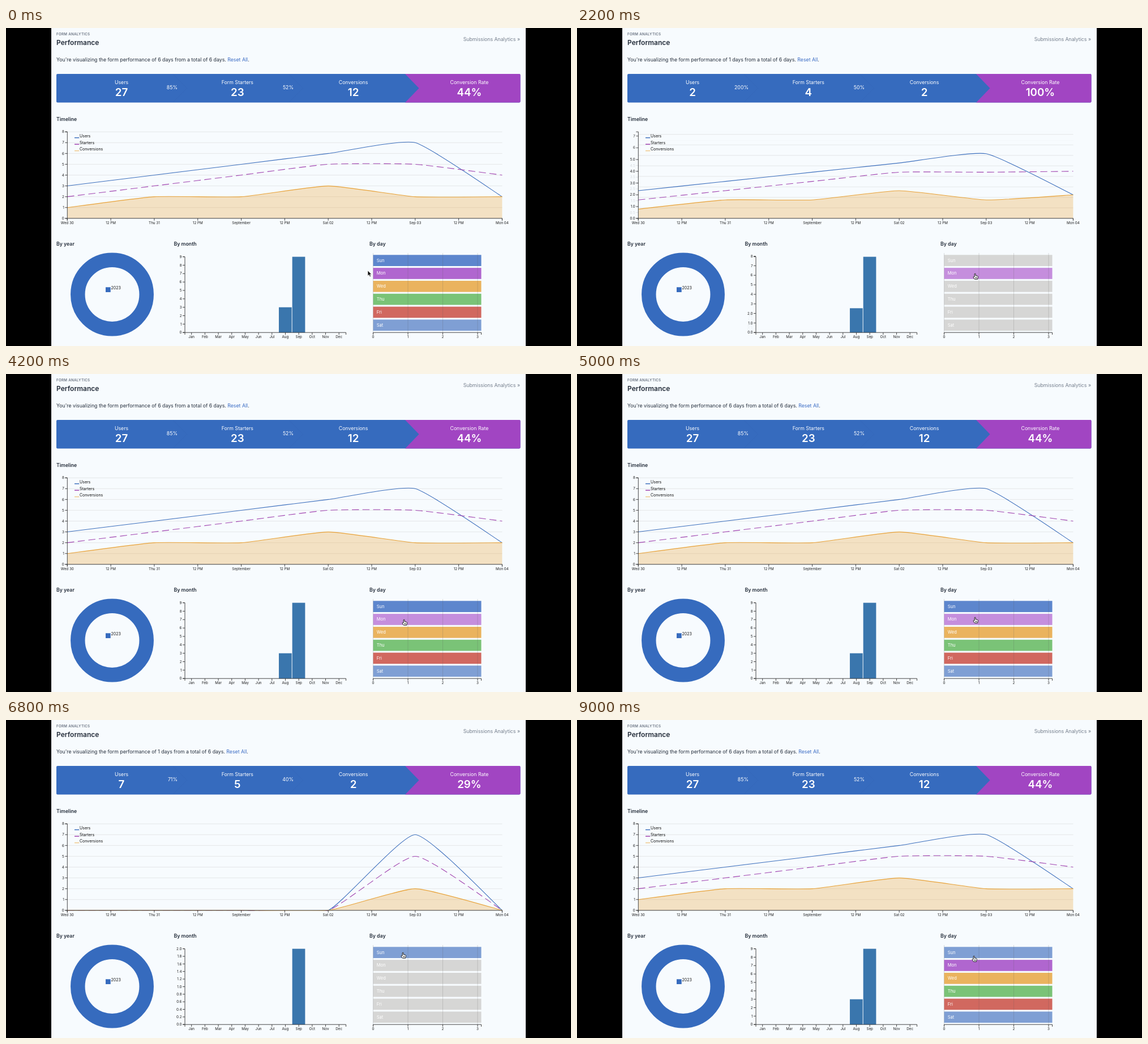
These frames come from a looping animation (998x561 px, 9200 ms). An HTML page:

```html
<!DOCTYPE html>
<html lang="en">
<head>
<meta charset="utf-8">
<title>Form performance</title>
<style>
  html, body { margin: 0; width: 100%; height: 100%; overflow: hidden; background: #000; }
  svg { display: block; width: 998px; height: 561px; font: 8.75px Inter, sans-serif; fill: #242d3a; }
  .head { font-weight: 600; }
  .axis { font-size: 6.25px; fill: #1c1c1c; }
  .legend { font-size: 7px; fill: #111; }
  .rule { fill: none; stroke: #333; stroke-width: .9; }
  .grid { stroke: #ccc; stroke-opacity: .5; stroke-width: .9; }
  .series { fill: none; stroke-width: 1.1; }
  .funnel { fill: #fff; text-anchor: middle; }
  .big { font-size: 18.75px; font-weight: 600; }
  .mid { text-anchor: middle; }
  .end { text-anchor: end; }
</style>
</head>
<body>
<svg viewBox="0 0 998 561">
  <defs>
    <clipPath id="plot"><rect x="108" y="182" width="769" height="154.5"/></clipPath>
    <clipPath id="timelineBox"><rect x="80" y="176" width="838" height="180"/></clipPath>
    <clipPath id="monthBox"><rect x="290" y="395" width="330" height="160"/></clipPath>
  </defs>
  <rect width="998" height="561" fill="#000"/>
  <rect x="80" width="838" height="561" fill="#f7fbfe"/>

  <text x="89" y="13.2" font-size="6.25" font-weight="600" letter-spacing=".25" fill="#6b7482">FORM ANALYTICS</text>
  <text x="89" y="29.6" font-size="12" class="head">Performance</text>
  <text x="908" y="23" class="end" fill="#737d8b">Submissions Analytics »</text>
  <text x="89" y="58.8">You're visualizing the form performance of <tspan id="days"></tspan> days from a total of 6 days. <tspan fill="#3a6bc4">Reset All</tspan>.</text>

  <rect x="89" y="81" width="819.5" height="50.5" rx="2" fill="#366bbe"/>
  <path d="M705 81H906.5a2 2 0 0 1 2 2V129.500a2 2 0 0 1 -2 2H705L729.500 106.200Z" fill="#a145c2"/>
  <path d="M295 81.500L319.500 106.200 295 131M500 81.500L524.500 106.200 500 131" fill="none" stroke="#2d5ca8" stroke-opacity=".2"/>
  <g id="funnel"></g>

  <g class="head">
    <text x="89" y="163.500">Timeline</text>
    <text x="89" y="383.500">By year</text>
    <text x="296.500" y="383.500">By month</text>
    <text x="642" y="383.500">By day</text>
  </g>

  <g id="timeline" clip-path="url(#timelineBox)"></g>
  <g id="timeAxis"></g>

  <circle cx="187.500" cy="470" r="60.700" fill="none" stroke="#366bbe" stroke-width="25.500"/>
  <rect x="176" y="457.300" width="8.700" height="8.700" fill="#366bbe"/>
  <text x="185.500" y="460.700" class="legend">2023</text>

  <g id="month" clip-path="url(#monthBox)"></g>
  <g id="monthAxis"></g>
  <g id="day"></g>
  <g id="cursor" stroke="#111" fill="#fff" stroke-width=".9" stroke-linejoin="round"></g>
</svg>
<script>
const LOOP = 9200, FRAME = 200, DURATION = 750;
const BLUE = '#3e70bd', PURPLE = '#a044b0', ORANGE = '#e8a33a';
const el = id => document.getElementById(id);
const lerp = (a, b, p) => a + (b - a) * p;
const clamp = v => Math.max(0, Math.min(1, v));
const ease = p => p < .5 ? 4 * p ** 3 : 1 - 4 * (1 - p) ** 3;
const text = (x, y, s, cls, more = '') => `<text x="${x}" y="${y}" class="${cls}" ${more}>${s}</text>`;
const line = (x1, y1, x2, y2, cls, more = '') =>
  `<line x1="${x1}" y1="${y1}" x2="${x2}" y2="${y2}" class="${cls}" ${more}/>`;
const range = n => [...Array(n).keys()];

// Daily counts, and the same counts with only one day selected
const users = [3, 4, 5, 6, 7, 2], starters = [2, 3, 4, 5, 5, 4], conversions = [1, 2, 2, 3, 2, 2];
const view = (day, timeScale, monthScale, months) => ({
  day, months, timeScale, monthScale,
  series: [users, starters, conversions].map(s => s.map((v, i) => day < 0 || i === day ? v : 0))
});
const scale = (max, step) => ({ max, step, digits: step < 1 ? 1 : 0, count: Math.round(max / step) + 1 });
const all = view(-1, scale(8, 1), scale(9, 1), [3, 9]);
const monday = view(5, scale(5, .5), scale(2, .2), [0, 2]);
const sunday = view(4, scale(8, 1), scale(2, .2), [0, 2]);
const changes = [
  { at: -2000, to: all, lag: 0 },
  { at: 1951, to: monday, lag: 90 },
  { at: 3380, to: all, lag: 20 },
  { at: 5980, to: sunday, lag: 20 },
  { at: 7660, to: all, lag: 20 }
];

const timeBox = { x: 108.3, base: 335.8, height: 152.6 };
const monthBox = { x: 316, base: 537.2, height: 133.6 };

// Shared ticks slide, others fade in or out while sliding
function yAxis(box, from, to, p) {
  const ticks = s => range(s.count).map(i => +(i * s.step).toFixed(1));
  const before = ticks(from), after = ticks(to);
  return [...new Set([...before, ...after])].map(v => {
    const y = box.base - box.height * lerp(v / from.max, v / to.max, p);
    const stays = after.includes(v);
    const opacity = !stays ? 1 - p : before.includes(v) ? 1 : p;
    if (opacity < .01 || y < 0) return '';
    return `<g opacity="${opacity}">${line(box.x - 4, y, box.x, y, 'rule')}${
      text(box.x - 5.5, y + 2.2, v.toFixed(stays ? to.digits : from.digits), 'axis end')}</g>`;
  }).join('') + `<path class="rule" d="M${box.x - 4} ${box.base - box.height}h4v${box.height}h-4"/>`;
}

function gridLines(box, from, to, p) {
  return range(to.count).map(i => {
    const end = i * to.step / to.max, isNew = i >= from.count;
    const y = box.base - box.height * (isNew ? end : lerp(i * from.step / from.max, end, p));
    return line(box.x, y, 876.5, y, 'grid', `opacity="${isNew ? p : 1}"`);
  }).join('');
}

// Cardinal spline
function curve(pts) {
  const k = .08, at = i => pts[Math.max(0, Math.min(pts.length - 1, i))];
  return `M${pts[0]}` + pts.slice(1).map((c, i) => {
    const a = at(i - 1), b = at(i), d = at(i + 2);
    return `C${b[0] + k * (c[0] - a[0])} ${b[1] + k * (c[1] - a[1])} ${
      c[0] - k * (d[0] - b[0])} ${c[1] - k * (d[1] - b[1])} ${c}`;
  }).join('');
}

function drawTimeline(from, to, p) {
  const { x, base, height } = timeBox;
  const [u, s, c] = from.series.map((row, n) => curve(row.map((v, i) => [
    x + i * 153.62,
    base - height * lerp(v / from.timeScale.max, to.series[n][i] / to.timeScale.max, p)
  ])));
  const legend = ['Users', 'Starters', 'Conversions'].map((name, i) =>
    line(121, 193.6 + i * 11.5, 129.3, 193.6 + i * 11.5, '',
      `stroke="${[BLUE, PURPLE, '#f0c88a'][i]}" stroke-width="1.5"`) +
    text(130, 193 + i * 11.5, name, 'legend')).join('');
  el('timeline').innerHTML = gridLines(timeBox, from.timeScale, to.timeScale, p) +
    `<g clip-path="url(#plot)">
      <path d="${c}V${base}H${x}Z" fill="${ORANGE}" opacity=".3"/>
      <path d="${u}" class="series" stroke="${BLUE}"/>
      <path d="${s}" class="series" stroke="${PURPLE}" stroke-dasharray="12.5 6.25"/>
      <path d="${c}" class="series" stroke="${ORANGE}"/>
    </g>` + yAxis(timeBox, from.timeScale, to.timeScale, p) + legend;
}

function drawMonth(from, to, p) {
  const { x, base, height } = monthBox;
  el('month').innerHTML = to.months.map((v, i) => {
    const h = height * lerp(from.months[i] / from.monthScale.max, v / to.monthScale.max, p);
    return `<rect x="${x + (7 + i) * 23.68 + .2}" y="${base - h}" width="22.7" height="${h}" fill="#3a76ad"/>`;
  }).join('') + yAxis(monthBox, from.monthScale, to.monthScale, p);
}

function drawFunnel({ day, series }) {
  const [u, s, c] = series.map(row => row.reduce((a, b) => a + b));
  const rate = (a, b) => Math.round(a / b * 100) + '%';
  el('days').textContent = day < 0 ? 6 : 1;
  el('funnel').innerHTML =
    [['Users', u], ['Form Starters', s], ['Conversions', c], ['Conversion Rate', rate(c, u)]].map(([name, n], i) =>
      text(204 + i * 204.8, 99, name, 'funnel') + text(204 + i * 204.8, 120.2, n, 'funnel big')).join('') +
    text(303, 108.3, rate(s, u), 'end', 'fill="#fff"') + text(508, 108.3, rate(c, s), 'end', 'fill="#fff"');
}

const rows = [
  ['Sun', '#5d86cd', 4], ['Mon', '#b066cf', 5], ['Wed', '#eab35e', 0],
  ['Thu', '#7ac377', 1], ['Fri', '#d1685f', 2], ['Sat', '#7f9fd4', 3]
];
const hoverFill = ['#7f9fd4', '#c58edd'];

function drawDay(selected, hovered) {
  el('day').innerHTML = rows.map(([name, fill, day], i) => {
    const y = 400.3 + i * 22.82;
    const off = selected >= 0 && selected !== day;
    return `<rect x="648.5" y="${y}" width="191" height="19.7" fill="${
      off ? '#d6d6d5' : i === hovered ? hoverFill[i] : fill}"/>` +
      text(654.8, y + 12.3, name, '', 'font-size="7.5" fill="#fff"');
  }).join('') + range(4).map(i => {
    const x = 648.5 + i * 61.5;
    return line(x, 397, x, 537.2, '', 'stroke="#555" stroke-opacity=".22" stroke-width=".9"') +
      line(x, 537.2, x, 541, 'rule') + text(x, 547.2, i, 'axis mid');
  }).join('') + '<path class="rule" d="M648.500 541v-3.800h191v3.800"/>';
}

const path = [
  [0, 639, 428], [300, 639, 428], [1100, 704, 438], [4700, 704, 438],
  [5000, 704, 434], [5600, 702, 415], [8500, 702, 415], [9000, 702, 421], [LOOP, 702, 423]
];
function cursorAt(t) {
  const i = path.findIndex(k => k[0] > t), a = path[i - 1], b = path[i];
  const p = (t - a[0]) / (b[0] - a[0]);
  return [lerp(a[1], b[1], p), lerp(a[2], b[2], p)];
}
const arrow = '<path d="M0 0V9.300L2.200 7.300 3.800 10.700 5.400 9.900 3.900 6.700H6.800Z" fill="#111" stroke="#fff" stroke-width=".6"/>';
const hand = '<path d="M-1.800 1V-4.300Q-.9-5.500 0-4.300V-1.200L3.300-.6Q4.600-.2 4.400 1.200L3.500 5.300H-1.500L-4 1.800Q-4-.2-1.800 1ZM0 1.500V4M1.800 1.500V4"/>';

function drawStaticAxes() {
  const dates = ['Wed 30', '12 PM', 'Thu 31', '12 PM', 'September', '12 PM', 'Sat 02', '12 PM', 'Sep 03', '12 PM', 'Mon 04'];
  const months = 'Jan Feb Mar Apr May Jun Jul Aug Sep Oct Nov Dec'.split(' ');
  const xAxis = (labels, x, step, y, dy) => labels.map((s, i) =>
    line(x + i * step, y, x + i * step, y + 4, 'rule') + text(x + i * step, y + dy, s, 'axis mid')).join('');
  el('timeAxis').innerHTML = xAxis(dates, 108.3, 76.81, 335.8, 10.3) +
    '<path class="rule" d="M108.300 339.800v-4h768.200v4"/>';
  el('monthAxis').innerHTML = xAxis(months, 327.7, 23.68, 537.2, 10) +
    '<path class="rule" d="M316 541v-3.800h284.500v3.800"/>';
}

function draw(t) {
  const n = changes.findLastIndex(c => c.at <= t);
  const { at, to, lag } = changes[n], from = n ? changes[n - 1].to : to;
  const progress = delay => ease(clamp((t - at - delay) / DURATION));
  const [x, y] = cursorAt(t), overRows = x > 648;
  drawFunnel(to);
  drawTimeline(from, to, progress(0));
  drawMonth(from, to, progress(lag));
  drawDay(to.day, overRows ? Math.floor((y - 405) / 22.82) : -1);
  el('cursor').setAttribute('transform', `translate(${x} ${y})`);
  el('cursor').innerHTML = overRows ? hand : arrow;
}

const start = performance.now();
let shown = -1;
function tick() {
  const t = Math.floor((performance.now() - start) % LOOP / FRAME) * FRAME;
  if (t !== shown) draw(shown = t);
  requestAnimationFrame(tick);
}
drawStaticAxes();
tick();
</script>
</body>
</html>
```
